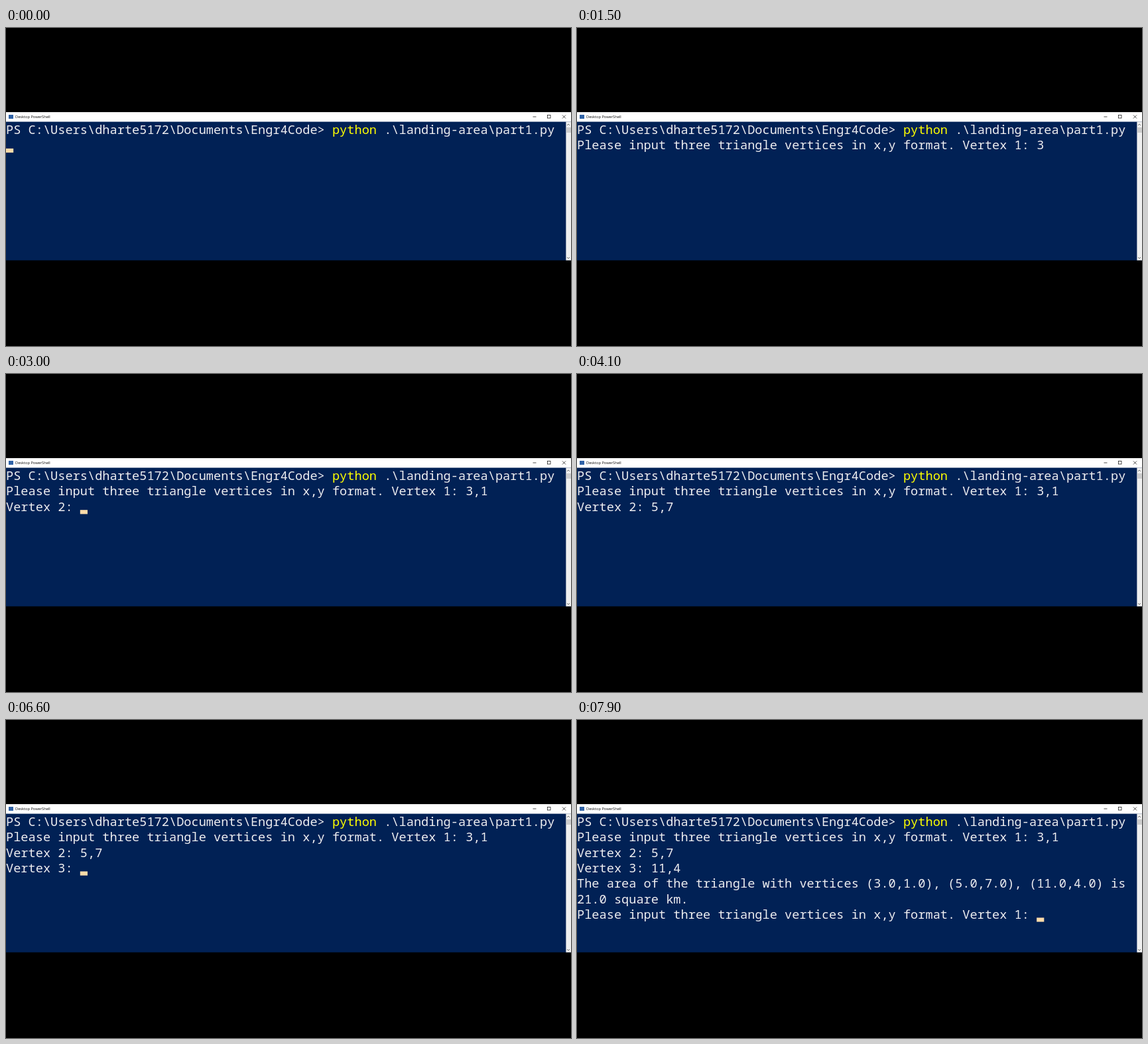
An HTML page with a canvas that plays this animation: 852 px wide and 480 px high, repeating every 8000 ms.

```html
<!DOCTYPE html>
<html lang="en">
<head>
<meta charset="utf-8">
<title>Terminal session</title>
<style>
  html, body { margin: 0; width: 100%; height: 100%; overflow: hidden; background: #000; }
  canvas { display: block; }
</style>
</head>
<body>
<canvas id="stage" width="852" height="480"></canvas>
<script>
const ctx = document.getElementById('stage').getContext('2d');
const LOOP = 8000;
const BLINK = 1110, LIT = 500;
const CELL = 11.18, LINE = 23.3, BASE = 160;
const PATH = 'PS C:\\Users\\dharte5172\\Documents\\Engr4Code> ';
const COMMAND = 'python';
const ASK = 'Please input three triangle vertices in x,y format. Vertex 1: ';
const RESULT = '\nThe area of the triangle with vertices (3.0,1.0), (5.0,7.0), (11.0,4.0) is\n21.0 square km.\n';

// Each step prints its text, then the keys are typed at a steady pace.
// The cursor starts to blink at the given time.
const steps = [
  { at: 0, text: PATH + COMMAND + ' .\\landing-area\\part1.py\n', blink: 0 },
  { at: 100, text: ASK, keys: '3,1', typing: 1500, pace: 200, blink: 1000 },
  { at: 2600, text: '\nVertex 2: ', keys: '5,7', typing: 3200, pace: 300, blink: 3000 },
  { at: 4400, text: '\nVertex 3: ', keys: '11,4', typing: 6700, pace: 260, blink: 5200 },
  { at: 7700, text: RESULT + ASK, blink: 7700 }
];

function box(color, x, y, w, h) {
  ctx.fillStyle = color;
  ctx.fillRect(x, y, w, h);
}

function line(...points) {
  ctx.beginPath();
  for (const [x, y] of points) ctx.lineTo(x, y);
  ctx.stroke();
}

function drawWindow() {
  box('#000', 0, 0, 852, 480);
  box('#012155', 0, 141, 852, 209.7);
  box('#fff', 0, 127, 852, 14.5);

  box('#2f62a6', 4, 131, 7, 6);
  ctx.fillStyle = '#111';
  ctx.font = '5.7px "Open Sans", sans-serif';
  ctx.fillText('Desktop PowerShell', 14, 136);

  ctx.lineWidth = 0.8;
  ctx.strokeStyle = '#222';
  line([794.5, 134], [799.5, 134]);
  ctx.strokeRect(816.5, 131.5, 4.5, 4.5);
  line([839, 131.5], [844, 136.5]);
  line([844, 131.5], [839, 136.5]);

  box('#f0f0f0', 844.4, 141.5, 7.6, 209.2);
  box('#cdcdcd', 844.8, 150, 7.2, 8);
  ctx.strokeStyle = '#555';
  line([846, 147], [848, 145], [850, 147]);
  line([846, 346], [848, 348], [850, 346]);
}

function typed({ keys = '', typing, pace }, t) {
  return keys.slice(0, Math.max(0, Math.floor((t - typing) / pace) + 1));
}

function drawTerminal(t) {
  const shown = steps.filter(step => step.at <= t);
  const rows = shown.map(step => step.text + typed(step, t)).join('').split('\n');

  ctx.font = '18.63px "Noto Sans Mono", monospace';
  rows.forEach((row, r) => [...row].forEach((ch, c) => {
    const yellow = r === 0 && c >= PATH.length && c < PATH.length + COMMAND.length;
    ctx.fillStyle = yellow ? '#ffff00' : '#eeedf0';
    ctx.fillText(ch, c * CELL, BASE + r * LINE);
  }));

  const since = t - shown.at(-1).blink;
  if (since >= 0 && since % BLINK < LIT) {
    const r = rows.length - 1;
    box('#fedba9', rows[r].length * CELL, 158.6 + r * LINE, CELL, 6.2);
  }
}

const start = performance.now();
function frame() {
  drawWindow();
  drawTerminal(Math.max(0, performance.now() - start) % LOOP);
  requestAnimationFrame(frame);
}
frame();
</script>
</body>
</html>
```
